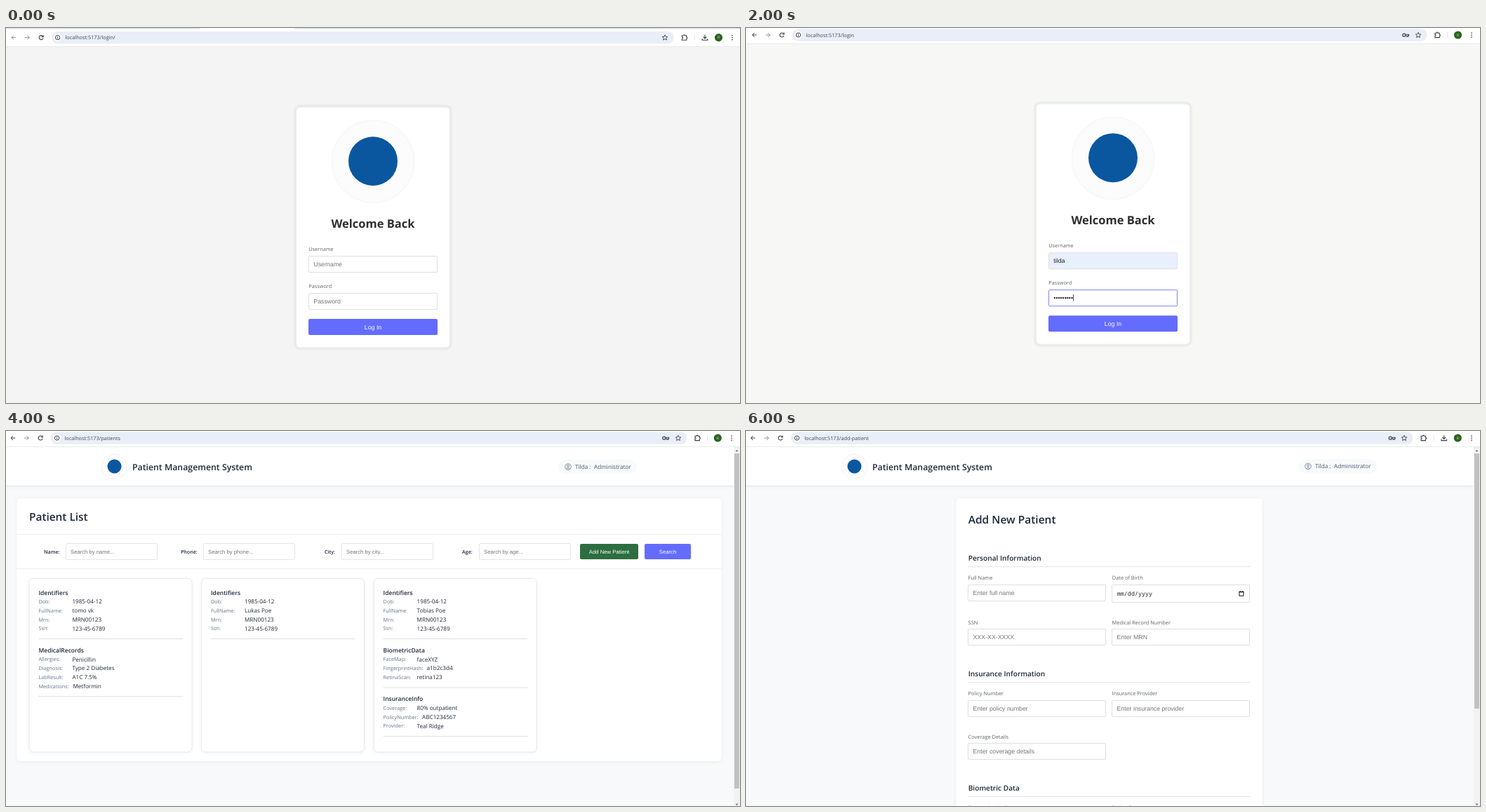
Animation of 1046x535 px, one loop 8 s. Source, as an HTML page:

```html
<!DOCTYPE html>
<html lang="en">
<head>
<meta charset="utf-8">
<title>Patient management demo</title>
<style>
html, body { margin: 0; width: 100%; height: 100%; overflow: hidden; background: #f4f4f4; }
svg { display: block; width: 1046px; height: 535px; text-rendering: geometricPrecision; }
text { font-family: "Open Sans", "Noto Sans", sans-serif; white-space: pre; }
.arial { font-family: "Liberation Sans", Arial, sans-serif; }
.mono { font-family: "Noto Sans Mono", "DejaVu Sans Mono", monospace; }
.soft { filter: drop-shadow(0 1px 2.5px rgba(0, 0, 0, .05)); }
</style>
</head>
<body>
<svg id="stage" viewBox="0 0 1046 535"></svg>
<script>
const INK = '#1e293b', GREY = '#757575', LABEL = '#5f6368', DARK = '#3c4043';
const BLUE = '#0a57a0', INDIGO = '#646cff';

// Text is placed by the middle of its capitals.
const text = (x, mid, str, size, fill, attrs = '') =>
  `<text x="${x}" y="${mid + size * 0.357}" font-size="${size}" fill="${fill}" ${attrs}>${str}</text>`;
const semi = (x, mid, str, size, fill = INK) => text(x, mid, str, size, fill, 'font-weight="600"');
const arial = (x, mid, str, size = 8.8, fill = GREY, attrs = '') =>
  text(x, mid, str, size, fill, 'class="arial" ' + attrs);
const rect = (x, y, w, h, r, fill, attrs = '') =>
  `<rect x="${x}" y="${y}" width="${w}" height="${h}" rx="${r}" fill="${fill}" ${attrs}/>`;
const circle = (x, y, r, fill, attrs = '') => `<circle cx="${x}" cy="${y}" r="${r}" fill="${fill}" ${attrs}/>`;
const line = (x1, x2, y, color) => rect(x1, y - 0.4, x2 - x1, 0.8, 0, color);
const icon = (x, y, d, color = DARK, width = 1) =>
  `<path transform="translate(${x} ${y})" d="${d}" fill="none" stroke="${color}" stroke-width="${width}"/>`;
// Outer edges are given; the one-pixel border lies inside them.
const box = (x, y, w, h, border = '#dfdfdf', fill = '#fff') =>
  rect(x + 0.5, y + 0.5, w - 1, h - 1, 1.5, fill, `stroke="${border}"`);
const button = (x, y, w, h, label, size, fill) =>
  rect(x, y, w, h, 2, fill) + arial(x + w / 2, y + h / 2, label, size, '#fff', 'text-anchor="middle"');

const ICONS = {
  back: 'M3.2 0H-3M0 -3L-3 0L0 3',
  forward: 'M-3.2 0H3M0 -3L3 0L0 3',
  reload: 'M2.8 1A3 3 0 1 1 2.2 -2M3 -3.4V-1H.6',
  star: 'M0 -3.8L1.1 -1.3L3.8 -1L1.8 .8L2.4 3.5L0 2.1L-2.4 3.5L-1.8 .8L-3.8 -1L-1.1 -1.3Z',
  puzzle: 'M-3.6 -2.8H-1.4A1.1 1.1 0 0 1 .8 -2.8H2.8V-.8A1.1 1.1 0 0 1 2.8 1.4V3.6H-3.6V1.4A1.1 1.1 0 0 0 -3.6 -.8Z',
  download: 'M0 -4V1.4M-2.4 -1L0 1.4L2.4 -1M-3.8 1.6V3.6H3.8V1.6',
  key: 'M-4.5 0A2.2 2.2 0 1 0 -.3 -.8H4.6V1H3.6V2.2H1.8V1H-.2M-4.5 0A2.2 2.2 0 0 1 -.3 -.8M-2.9 0H-1.9'
};

// Browser toolbar; left is the back arrow, tools maps icon names to x.
function toolbar({ path, y = 10, left, right, tools, sep, avatar, dots, bottom = 22.5, backColor = DARK }) {
  let s = rect(0, 0, 1046, bottom, 0, '#fff') + line(0, 1046, bottom, '#e4e6e8');
  s += rect(left + 54, y - 8.7, right - left - 54, 17.4, 8.7, '#e9eef9');
  s += icon(left, y, ICONS.back, backColor) + icon(left + 19.3, y, ICONS.forward, '#8d9094') +
    icon(left + 39.2, y, ICONS.reload, DARK, 1.1);
  s += circle(left + 62.6, y, 5.5, '#fff') + circle(left + 62.6, y, 3.2, 'none', `stroke="${DARK}" stroke-width="1"`) +
    icon(left + 62.6, y, 'M0 -1.8V-.9M0 -.3V1.8', DARK);
  s += text(left + 73.5, y, 'localhost:5173/' + path, 7.3, '#45484c');
  for (const name in tools) s += icon(tools[name], y, ICONS[name], DARK, name === 'star' ? 0.9 : 1.1);
  s += rect(sep - 0.4, y - 4, 0.8, 8, 0, '#cfdcf3');
  s += circle(avatar, y, 5.6, '#2b6420') + text(avatar, y, 'R', 5, '#dfe9dc', 'text-anchor="middle"');
  for (const dy of [-3, 0, 3]) s += circle(dots, y + dy, 0.85, DARK);
  return s;
}

function login(bg, dy, user, pass, ring) {
  const field = (mid, label, value, hint, border, fill) =>
    text(431.3, mid - 22, label, 7.3, LABEL) + box(431, mid - 12, 184, 24, border, fill) +
    arial(438.3, mid, value || hint, 8.8, value ? '#222' : GREY);
  return rect(0, 0, 1046, 535, 0, bg) + `<g transform="translate(0 ${dy})">` +
    rect(410, 109.5, 226, 350, 9, ring) + rect(414, 113.5, 218, 342, 5, '#fff') +
    circle(523, 190.5, 58.5, '#fcfcfc', 'stroke="#f8f8f8" stroke-width="2"') + circle(523, 190, 35, BLUE) +
    text(523, 279.3, 'Welcome Back', 16.5, '#2f2f2f', 'font-weight="700" text-anchor="middle"') +
    field(337, 'Username', user, 'Username', '#dfdfdf', user ? '#e8f0fe' : '#fff') +
    field(390, 'Password', pass, 'Password', pass ? '#7d84fa' : '#dfdfdf') +
    (pass ? rect(466, 385, 0.8, 9.5, 0, '#222') : '') +
    button(431, 415, 184, 23, 'Log In', 8.8, INDIGO) + '</g>';
}

// Page header, background and scrollbar shared by the inner pages.
function page(userMid, thumbEnd, body) {
  return rect(0, 0, 1046, 535, 0, '#f8f9fb') + body +
    rect(0, 20, 1037, 58, 0, '#fff', 'class="soft"') + line(0, 1037, 78.2, '#e3e5e8') +
    circle(154.5, 51, 18, '#fdfdfd', 'stroke="#f3f4f5" stroke-width="1"') + circle(154.5, 50.5, 10, BLUE) +
    semi(180, 51.5, 'Patient Management System', 12.3) +
    rect(787, userMid - 10.5, 112, 21, 10.5, '#f8fafc') +
    circle(801, userMid, 4.3, 'none', 'stroke="#64748b" stroke-width=".8"') +
    circle(801, userMid - 1, 1.5, 'none', 'stroke="#64748b" stroke-width=".8"') +
    icon(801, userMid, 'M-2.7 3.2Q0 .4 2.7 3.2', '#64748b', 0.8) +
    text(811, userMid, 'Tilda :', 8.2, '#475569') + text(838, userMid, 'Administrator', 8.2, '#475569') +
    rect(1037, 22, 9, 513, 0, '#f2f2f2') + rect(1038, 32, 7, thumbEnd - 32, 0, '#c1c1c1') +
    '<path d="M1039.5 29.2h4l-2 -2.4zM1039.5 531.8h4l-2 2.4z" fill="#707070"/>';
}

const identity = name => ['Identifiers',
  ['Dob', '1985-04-12'], ['FullName', name], ['Mrn', 'MRN00123'], ['Ssn', '123-45-6789']];

const patients = [
  [identity('tomo vk'), ['MedicalRecords',
    ['Allergies', 'Penicillin'], ['Diagnosis', 'Type 2 Diabetes'], ['LabResult', 'A1C 7.5%'],
    ['Medications', 'Metformin', 49]]],
  [identity('Lukas Poe')],
  [identity('Tobias Poe'),
    ['BiometricData', ['FaceMap', 'faceXYZ'], ['FingerprintHash', 'a1b2c3d4', 62], ['RetinaScan', 'retina123']],
    ['InsuranceInfo', ['Coverage', '80% outpatient'], ['PolicyNumber', 'ABC1234567', 55.5], ['Provider', 'Teal Ridge']]]
];

function card(sections, i) {
  const left = 33 + 245.6 * i, x = left + 13.4;
  let y = 230.5;
  let s = rect(left, 210.3, 232, 247.7, 6, '#fff', 'stroke="#e2e6eb" stroke-width=".9" class="soft"');
  for (const [title, ...rows] of sections) {
    s += semi(x, y, title, 8.5);
    rows.forEach(([key, value, gap = 48], n) => {
      const mid = y + 13 + 12.7 * n;
      s += text(x, mid, key + ':', 7.3, '#64748b', 'font-weight="500"') +
        text(x + gap, mid, value, 8.15, INK, 'font-weight="500"');
    });
    y += 15.2 + 12.7 * rows.length;
    s += line(x, x + 205.5, y, '#d5d8dc');
    y += 16.3;
  }
  return s;
}

function patientList() {
  let s = rect(15.3, 96, 1004.5, 375, 6, '#fff', 'class="soft"') + semi(33, 122.3, 'Patient List', 15.4) +
    line(15.3, 1019.8, 147.3, '#e8ebef') + line(15.3, 1019.8, 196.7, '#e8ebef');
  [['Name', 54], ['Phone', 249], ['City', 454], ['Age', 650]].forEach(([name, x], i) => {
    const left = Math.round(85 + 196.4 * i);
    s += semi(x, 172.3, name + ':', 7.1) + box(left, 160, 131, 24, '#e2e6eb') +
      arial(left + 7, 172, `Search by ${name.toLowerCase()}...`, 7.7);
  });
  s += button(818, 161, 83, 22, 'Add New Patient', 7.7, '#2c6e40') +
    button(910, 161, 66, 22, 'Search', 7.7, INDIGO);
  return s + patients.map(card).join('');
}

function patientForm() {
  const heading = (mid, str) => semi(316.7, mid, str, 10.15) + line(316.7, 718.5, mid + 12.5, '#d9dce6');
  const field = (col, mid, label, hint, gap = 10) => {
    const x = 316 + 205 * col, top = Math.round(mid + gap);
    return text(x + 0.6, mid, label, 7.4, LABEL) + box(x, top, 197, 24) + arial(x + 7.5, top + 12, hint);
  };
  return rect(299.3, 96, 436.7, 460, 6, '#fff', 'class="soft"') + semi(316.7, 126, 'Add New Patient', 15.5) +
    heading(181.2, 'Personal Information') +
    field(0, 209.2, 'Full Name', 'Enter full name') +
    text(521.8, 209.2, 'Date of Birth', 7.4, LABEL) + box(521, 219, 197, 26) +
    text(528.8, 232.4, 'mm/dd/yyyy', 8.4, '#222', 'class="mono"') +
    icon(706, 232, 'M-3 -2.6H3V3.2H-3ZM-3.4 -2.2H3.4M-1.8 -4V-2.6M1.8 -4V-2.6', '#111') +
    field(0, 273, 'SSN', 'XXX-XX-XXXX', 9) +
    field(1, 273, 'Medical Record Number', 'Enter MRN', 9) +
    heading(346, 'Insurance Information') +
    field(0, 374, 'Policy Number', 'Enter policy number') +
    field(1, 374, 'Insurance Provider', 'Enter insurance provider') +
    field(0, 436, 'Coverage Details', 'Enter coverage details', 9) +
    heading(509, 'Biometric Data') +
    field(0, 537, 'Fingerprint Hash', '') + field(1, 537, 'Retina Scan', '');
}

const scenes = [
  login('#f4f4f4', 0, '', '', '#ebebeb') +
    toolbar({ path: 'login/', y: 13.6, left: 11, right: 952, bottom: 26.3, backColor: '#8d9094',
      tools: { star: 939, puzzle: 967, download: 996 }, sep: 981, avatar: 1015.5, dots: 1035 }) +
    rect(0, 0, 277, 1.3, 0, '#d3e1fa') + rect(411, 0, 635, 1.3, 0, '#d3e1fa'),
  login('#f7f7f6', -4.8, 'tilda', '•'.repeat(9), '#eceded') +
    toolbar({ path: 'login', left: 12, right: 970.5,
      tools: { key: 940, star: 958, puzzle: 985.5 }, sep: 999.7, avatar: 1014.5, dots: 1034 }),
  page(51, 510, patientList()) +
    toolbar({ path: 'patients', left: 10, right: 970.5,
      tools: { key: 940, star: 958, puzzle: 985.5 }, sep: 999.7, avatar: 1014.3, dots: 1034 }),
  page(50.3, 396, patientForm()) +
    toolbar({ path: 'add-patient', left: 10, right: 950.5,
      tools: { key: 920.5, star: 938, puzzle: 965.7, download: 994.7 }, sep: 980, avatar: 1014.3, dots: 1034 })
];

const stage = document.getElementById('stage');
stage.innerHTML = scenes.map(s => `<g display="none">${s}</g>`).join('');
const groups = [...stage.children];
const start = performance.now();

function draw() {
  const now = Math.floor((performance.now() - start) / 2000) % groups.length;
  groups.forEach((g, i) => g.setAttribute('display', i === now ? 'inline' : 'none'));
  requestAnimationFrame(draw);
}
draw();
</script>
</body>
</html>
```
